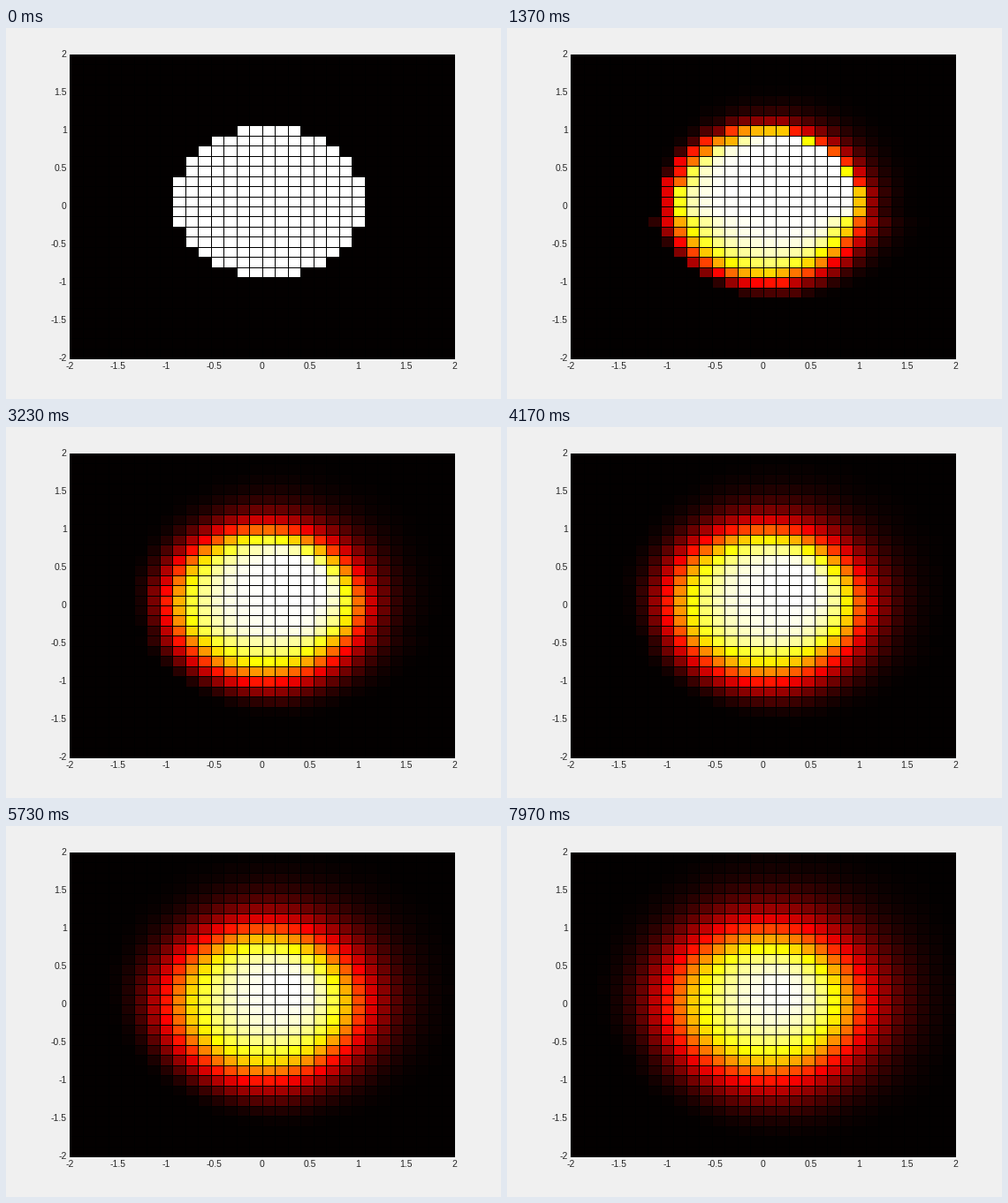
Write a matplotlib script that moves like this. It is 560 px wide and 420 px high and loops after 8 s.

```python
import matplotlib.pyplot as plt
import numpy as np
from matplotlib.animation import FuncAnimation
from matplotlib.colors import ListedColormap

WIDTH, HEIGHT, DPI = 560, 420, 100
LEFT, RIGHT, TOP, BOTTOM = 72.1, 507.1, 30, 374
INTERVAL, FRAMES = 20, 400
ROWS_PER_SECOND, ROW_COUNT = 30, 240
POINTS = 31
PIXEL = 72 / DPI


def hot_map(levels=256):
    """Black-red-yellow-white ramp."""
    ramp = 3 * levels // 8
    step = np.arange(1, levels + 1)
    red = step / ramp
    green = (step - ramp) / ramp
    blue = (step - 2 * ramp) / (levels - 2 * ramp)
    return ListedColormap(np.clip(np.column_stack([red, green, blue]), 0, 1))


def relax_row(u, j):
    """Replace each inner point of a row by its neighbours' mean, in place."""
    for k in range(1, POINTS - 1):
        u[j, k] = (u[j, k - 1] + u[j, k + 1] + u[j - 1, k] + u[j + 1, k]) / 4


def simulate(axis):
    """Relax one row per step, sweeping upwards again and again."""
    x, y = np.meshgrid(axis, axis)
    u = (x**2 + y**2 < 1).astype(float)
    states = []
    for step in range(ROW_COUNT):
        relax_row(u, 1 + step % (POINTS - 2))
        states.append(u[:-1, :-1] / u.max())
    return states


grid = np.linspace(-2, 2, POINTS)
states = simulate(grid)

fig = plt.figure(figsize=(WIDTH / DPI, HEIGHT / DPI), dpi=DPI, facecolor="#f0f0f0")
ax = fig.add_axes([LEFT / WIDTH, 1 - BOTTOM / HEIGHT,
                   (RIGHT - LEFT) / WIDTH, (BOTTOM - TOP) / HEIGHT],
                  facecolor="black")
mesh = ax.pcolormesh(grid, grid, states[0], cmap=hot_map(), vmin=0, vmax=1,
                     edgecolors="black", linewidth=PIXEL, snap=True)
ax.set(xlim=(-2, 2), ylim=(-2, 2))

ticks = np.arange(-2, 2.5, 0.5)
labels = [f"{t:g}" for t in ticks]
font = dict(fontname="Liberation Sans", fontsize=10.4 * PIXEL, color="#262626")
ax.set_xticks(ticks, labels, **font)
ax.set_yticks(ticks, labels, va="center", **font)
ax.tick_params(axis="x", length=0, pad=4.5 * PIXEL)
ax.tick_params(axis="y", length=0, pad=3.5 * PIXEL)
for spine in ax.spines.values():
    spine.set(color="black", linewidth=PIXEL)


def update(n):
    # Row times fall on whole hundredths of a second.
    seconds = n * INTERVAL / 1000 + 0.015
    step = int(seconds * ROWS_PER_SECOND + 1e-6)
    mesh.set_array(states[min(step, ROW_COUNT - 1)])
    return [mesh]


anim = FuncAnimation(fig, update, frames=FRAMES, interval=INTERVAL,
                     repeat=True, repeat_delay=0, blit=False)
plt.show()
```
